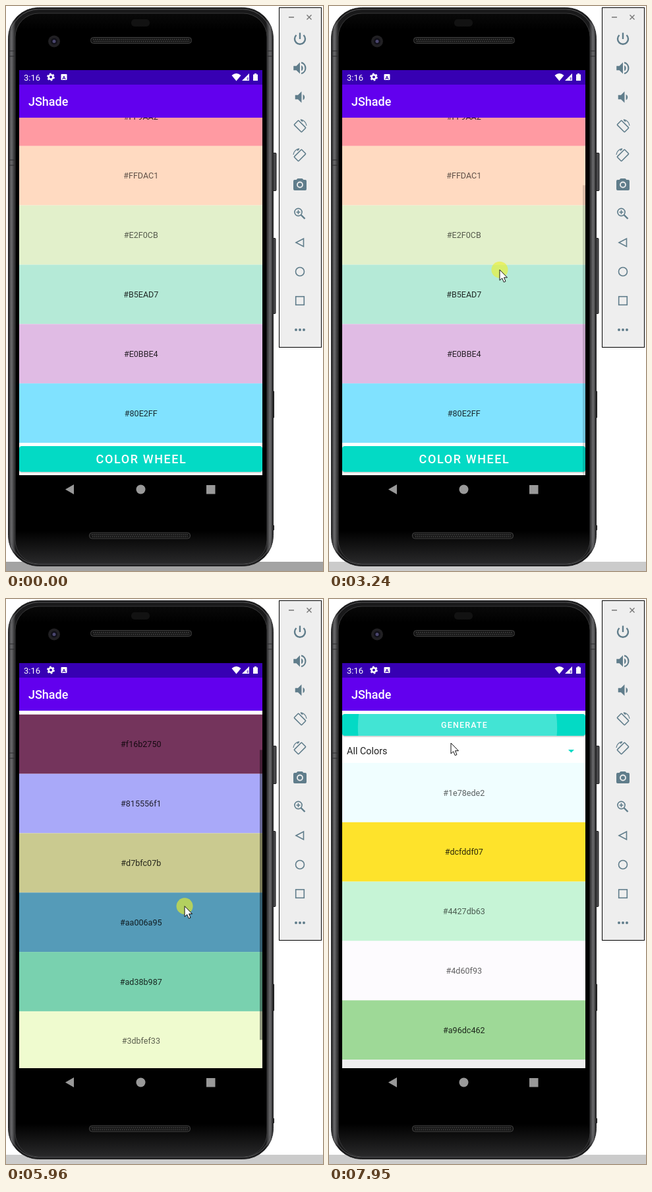
These frames come from a looping animation (481 px wide and 855 px high, 8000 ms). An HTML page:

```html
<!DOCTYPE html>
<html lang="en">
<head>
<meta charset="utf-8">
<title>Color list</title>
<style>
  html, body { margin: 0; width: 100%; height: 100%; overflow: hidden; background: #fff; }
  svg { display: block; width: 100vw; height: 100vh; font-family: Roboto, sans-serif; }
  .button { font-weight: 500; fill: #fff; text-anchor: middle; letter-spacing: .0892em; }
  .icons { fill: #607d8b; }
  .line { fill: none; stroke: #607d8b; stroke-width: 1.6; }
</style>
</head>
<body>
<svg viewBox="0 0 481 855">
  <defs>
    <linearGradient id="frame">
      <stop offset="0" stop-color="#1c1c1d"/><stop offset=".012" stop-color="#6b6b6d"/>
      <stop offset=".028" stop-color="#19191a"/><stop offset=".972" stop-color="#19191a"/>
      <stop offset=".988" stop-color="#6b6b6d"/><stop offset="1" stop-color="#1c1c1d"/>
    </linearGradient>
    <linearGradient id="face" x2="0" y2="1">
      <stop offset="0" stop-color="#090909"/><stop offset=".03" stop-color="#000"/>
      <stop offset=".94" stop-color="#000"/><stop offset="1" stop-color="#29292a"/>
    </linearGradient>
    <clipPath id="viewport"><path d="M20 169H389V710H20Z"/></clipPath>
    <clipPath id="buttonShape"><rect x="20" y="174" width="369" height="33" rx="4"/></clipPath>
    <g id="grille">
      <rect x=".5" y=".5" width="153" height="9" rx="4" fill="#151515" stroke="#414141"/>
      <path d="M4 3.5H150M5 6.5H150" stroke="#4a4a4a" stroke-width="1.5" stroke-dasharray="1.5 1.5"/>
    </g>
    <path id="speaker" d="M3 9v6h4l5 5V4L7 9H3z"/>
    <g id="rotate" class="line">
      <rect x="-4.7" y="-8" width="9.4" height="16" rx="1" transform="rotate(-45)"/>
      <path d="M1-10A10 10 0 0 1 10-1M1-10L4-7" stroke-width="1.3"/>
    </g>
  </defs>

  <path id="footer" d="M0 841H481V855H0Z"/>

  <!-- Phone body -->
  <g fill="#4a4a4c" stroke="#1b1b1c">
    <rect x="402" y="222.500" width="8" height="57" rx="1"/>
    <rect x="402" y="351.500" width="7" height="114" rx="1"/>
    <path d="M402 583H406.500V623H402ZM402 786H406.500V793H402Z"/>
  </g>
  <rect x="3.500" y="2.500" width="402" height="845" rx="46" fill="url(#frame)" stroke="#262627"/>
  <rect x="6.500" y="5" width="396" height="840" rx="43" fill="none" stroke="#59595b"/>
  <path d="M3 68H13M3 76H13M3 233H13M3 241H13M396 68H406M396 76H406" stroke="#2b2b2c"/>
  <rect x="14" y="11" width="382" height="833" rx="36" fill="url(#face)" stroke="#39393a"/>
  <rect x="190" y="20" width="28" height="11" rx="5" fill="#121212"/>
  <circle cx="73" cy="53.500" r="9" fill="#212023"/>
  <circle cx="73" cy="53.500" r="5" fill="#111019"/>
  <circle cx="73" cy="53.500" r="2.500" fill="#4b4770"/>
  <use href="#grille" x="128" y="47"/>
  <use href="#grille" x="126" y="796.500"/>

  <!-- App content -->
  <path d="M20 169H389V710H20Z" fill="#fff"/>
  <g clip-path="url(#viewport)">
    <g id="content">
      <rect x="20" y="176" width="369" height="33" rx="4" fill="#d9d9d9"/>
      <rect x="20" y="174" width="369" height="33" rx="4" fill="#03dac5"/>
      <circle id="ripple" cx="195" cy="194" fill="#fff" clip-path="url(#buttonShape)"/>
      <text class="button" x="205.500" y="195.300" font-size="12.570">GENERATE</text>
      <text x="27" y="235.300" font-size="14.400" fill="#212121">All Colors</text>
      <path d="M363 228H372L367.500 232.500Z" fill="#03dac5"/>
      <g id="rows" font-size="12.570" text-anchor="middle"></g>
      <rect x="20" y="794" width="369" height="39" rx="4" fill="#d9d9d9"/>
      <rect x="20" y="792" width="369" height="39" rx="4" fill="#03dac5"/>
      <text class="button" x="205.500" y="818.300" font-size="18">COLOR WHEEL</text>
    </g>
    <rect id="thumb" x="385" width="4" height="438.800"/>
  </g>

  <!-- System bars -->
  <path d="M20 97H389V119H20Z" fill="#3700b3"/>
  <path d="M20 119H389V169H20Z" fill="#6200ee"/>
  <g fill="#fff">
    <text x="27" y="112.700" font-size="13">3:16</text>
    <text x="34" y="150.700" font-size="18" font-weight="500">JShade</text>
    <circle cx="68" cy="107.500" r="3.300" fill="none" stroke="#fff" stroke-width="2.600"/>
    <circle cx="68" cy="107.500" r="5" fill="none" stroke="#fff" stroke-width="1.800" stroke-dasharray="2.618"/>
    <rect x="83.500" y="103" width="9" height="9" rx="1"/>
    <text x="88" y="110.500" font-size="8" font-weight="700" text-anchor="middle" fill="#3700b3">A</text>
    <path d="M342.500 105Q349.500 99 356.500 105L349.500 113.500ZM358 113L369 102V113ZM375 103.500H377V102H380V103.500H382V113H375Z"/>
    <path d="M365.500 108V112H368V108Z" fill="#3700b3" opacity=".5"/>
  </g>
  <g fill="#999">
    <path d="M90 731.500L103 724V739ZM304 725H317.500V738.500H304Z"/>
    <circle cx="204.500" cy="731.500" r="7"/>
  </g>

  <!-- Emulator toolbar -->
  <rect x="414.500" y="2.500" width="64" height="514" fill="#eee" stroke="#000"/>
  <path d="M429 17H437M456.500 13.500L463.500 20.500M463.500 13.500L456.500 20.500" stroke="#757575" stroke-width="1.400"/>
  <g class="icons">
    <path class="line" d="M440.500 44A8 8 0 1 0 451.500 44M446 40.500V50" style="stroke-width:2.400"/>
    <g transform="translate(433 81) scale(1.080)">
      <use href="#speaker"/>
      <path d="M14 8v8a4.500 4.500 0 0 0 0-8z"/>
      <path class="line" d="M14 4.300a8 8 0 0 1 0 15.400" style="stroke-width:2"/>
    </g>
    <g transform="translate(435.500 125) scale(1.080)">
      <use href="#speaker"/><path d="M14 8v8a4.500 4.500 0 0 0 0-8z"/>
    </g>
    <use href="#rotate" x="446" y="182"/>
    <use href="#rotate" transform="translate(446 226) scale(-1 1)"/>
    <path d="M442.500 261L440.500 263H438Q436 263 436 265V277Q436 279 438 279H454Q456 279 456 277V265Q456 263 454 263H451.500L449.500 261Z"/>
    <circle cx="446" cy="270.500" r="4" fill="none" stroke="#eee" stroke-width="1.800"/>
    <g class="line">
      <circle cx="443.500" cy="312" r="5.600"/>
      <path d="M440.500 312H446.500M443.500 309V315"/>
      <path d="M447.500 316L453.500 322" stroke-width="2.400"/>
      <path d="M440 358L451.500 352V364Z"/>
      <circle cx="446" cy="402" r="6.500"/>
      <rect x="439.700" y="439.700" width="12.600" height="12.600"/>
    </g>
    <circle cx="440" cy="490" r="2"/><circle cx="446" cy="490" r="2"/><circle cx="452" cy="490" r="2"/>
  </g>

  <g id="cursor">
    <circle id="press" r="12.500" fill="#eef028" opacity=".62"/>
    <path d="M0 0V16L3.700 12.700L6.300 18.700L9 17.500L6.500 11.700H11.500Z" fill="#fff" stroke="#111"/>
  </g>
</svg>
<script>
const LOOP = 8000, START = 460, STEP = 66.1, ROW = 89.83;
const $ = id => document.getElementById(id);

// Each palette: start time, then "label fill" pairs.
const palettes = [
  [0, '#FF9AA2 #ff9aa2', '#FFDAC1 #ffdac1', '#E2F0CB #e2f0cb', '#B5EAD7 #b5ead7', '#E0BBE4 #e0bbe4', '#80E2FF #80e2ff'],
  [4250, '#f16b2750 #74345c', '#815556f1 #a9a9f9', '#d7bfc07b #caca90', '#aa006a95 #559bb8', '#ad38b987 #79d1af', '#3dbfef33 #effbcf'],
  [7200, '#5c94d0a1 #c2e2c7', '#7be08c52 #f0c4a6', '#4fa3b7e8 #d5e2f6', '#93c9a05e #d2b491', '#62d9e47c #d4eeae', '#38b1c6d9 #e9f1f6'],
  [7850, '#1e78ede2 #f0feff', '#dcfddf07 #fee32b', '#4427db63 #c6f4d6', '#4d60f93 #fdfbfe', '#a96dc462 #9ed997', '#2fc0c0c0 #efefef']
];

const pointer = [
  [460, 262, 330], [790, 250, 400], [860, 250, 400], [1319, 240, 517], [1500, 236, 640], [1700, 238, 682],
  [2100, 245, 640], [2250, 250, 600], [2800, 262, 310], [3000, 258, 330], [3239, 259, 400],
  [3700, 250, 540], [3900, 230, 480], [4180, 200, 195], [5021, 200, 195], [5087, 222, 292],
  [5300, 275, 520], [5680, 272, 400], [5800, 272, 412], [5958, 271, 469], [6200, 265, 540],
  [6400, 260, 500], [6800, 185, 195], [7780, 185, 195], [7929, 185, 218]
];
const scrolling = [
  [860, 126], [1319, 9], [1400, 0], [2250, 0], [2700, 126], [3239, 126], [3650, 0],
  [5350, 0], [5620, 126], [5800, 126], [5958, 69], [6150, 0]
];
const thumbAlpha = [
  [800, 0], [900, .4], [1750, .4], [2000, 0], [2250, 0], [2350, .4], [2850, .4], [3150, 0], [3239, .15],
  [3350, .4], [3900, .4], [4150, 0], [5300, 0], [5400, .4], [6400, .4], [6650, 0]
];
const presses = [[800, 1560], [2200, 2900], [3100, 3750], [4180, 4270], [5300, 6250], [7080, 7180], [7740, 7850]];
const clicks = [4180, 7080, 7760];

// Linear interpolation of column `col` in a list of [time, values...].
function track(keys, t, col = 1) {
  const i = keys.findIndex(k => k[0] > t);
  if (i === 0) return keys[0][col];
  if (i < 0) return keys[keys.length - 1][col];
  const a = keys[i - 1], b = keys[i];
  return a[col] + (b[col] - a[col]) * (t - a[0]) / (b[0] - a[0]);
}

function add(tag, attrs) {
  const el = document.createElementNS('http://www.w3.org/2000/svg', tag);
  for (const name in attrs) el.setAttribute(name, attrs[name]);
  return $('rows').appendChild(el);
}

const rows = Array.from({ length: 6 }, (_, i) => {
  const y = 248 + i * ROW;
  return {
    swatch: add('rect', { x: 20, y, width: 369, height: ROW }),
    label: add('text', { x: 204.8, y: y + 49.5 })
  };
});

function luminance(hex) {
  const [r, g, b] = [1, 3, 5].map(i => parseInt(hex.substr(i, 2), 16));
  return .3 * r + .59 * g + .11 * b;
}

let shown;
function showPalette(palette) {
  if (palette === shown) return;
  shown = palette;
  rows.forEach(({ swatch, label }, i) => {
    const [name, fill] = palette[i + 1].split(' ');
    swatch.setAttribute('fill', fill);
    label.textContent = name;
    label.setAttribute('fill-opacity', luminance(fill) > 220 ? .62 : .82);
  });
}

function draw(time) {
  const t = time < START ? 0 : START + Math.floor((time - START) / STEP) * STEP;
  const scroll = track(scrolling, t);
  showPalette(palettes.filter(p => p[0] <= t).pop());
  $('content').setAttribute('transform', `translate(0 ${-scroll})`);
  $('thumb').setAttribute('y', 169 + scroll * 541 / 667);
  $('thumb').setAttribute('opacity', track(thumbAlpha, t));

  const age = t - (clicks.filter(c => c <= t).pop() ?? -LOOP);
  $('ripple').setAttribute('r', Math.min(age * .893, 400));
  $('ripple').setAttribute('opacity', track([[300, .25], [500, 0]], age));

  $('cursor').setAttribute('visibility', time < START ? 'hidden' : 'visible');
  $('cursor').setAttribute('transform', `translate(${track(pointer, t)} ${track(pointer, t, 2)})`);
  $('press').setAttribute('display', presses.some(([a, b]) => t >= a && t < b) ? 'inline' : 'none');

  const gray = Math.round(track([[400, 163], [700, 203]], t));
  $('footer').setAttribute('fill', `rgb(${gray},${gray},${gray})`);
}

const begin = performance.now();
function tick() {
  draw((performance.now() - begin) % LOOP);
  requestAnimationFrame(tick);
}
tick();
</script>
</body>
</html>
```
